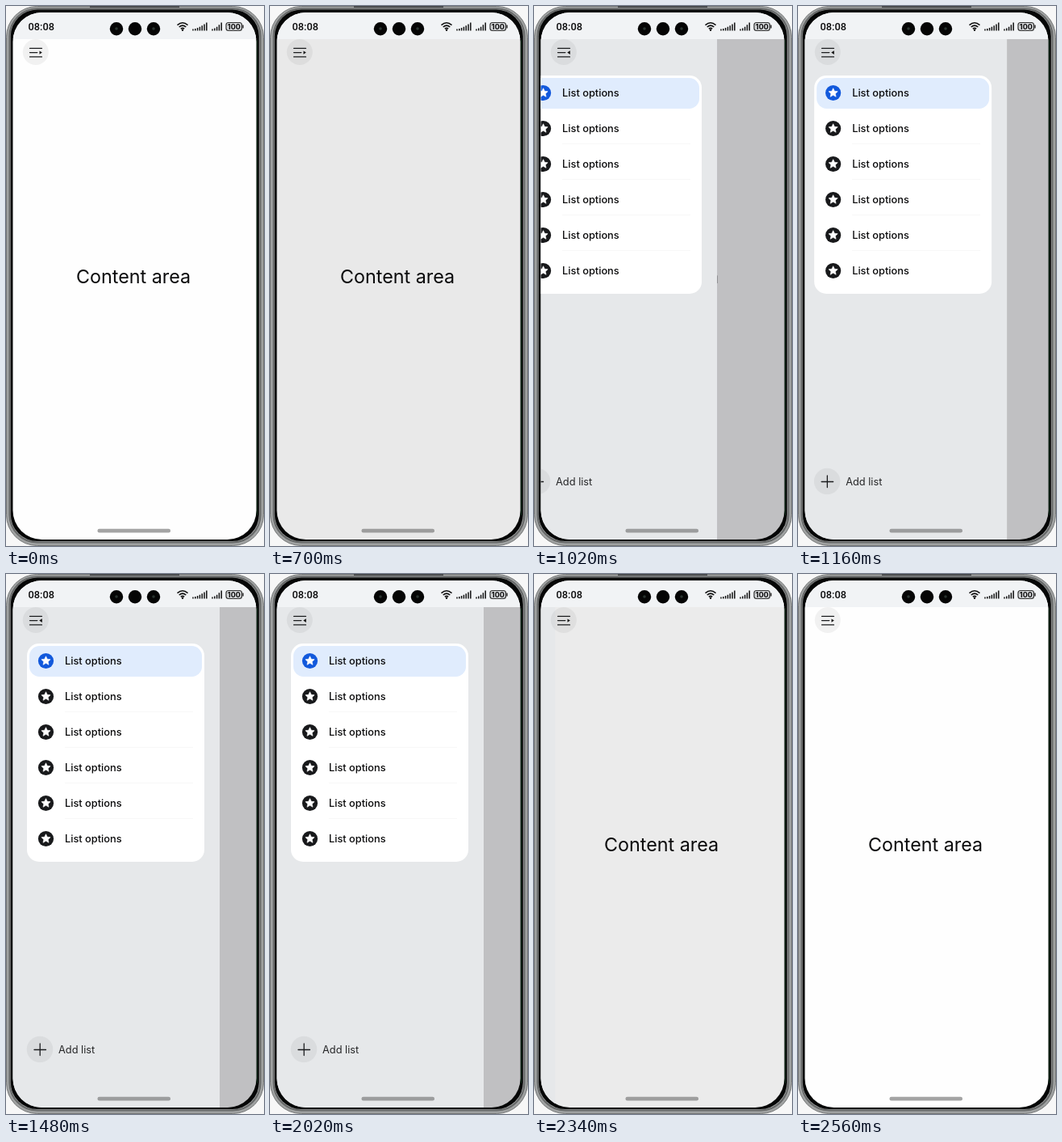
An HTML page for the animation above (2800 ms loop, 320 by 668 pixels).

```html
<!DOCTYPE html>
<html lang="en">
<head>
<meta charset="utf-8">
<title>Sidebar overlay</title>
<style>
  html, body { margin: 0; height: 100%; overflow: hidden; background: #f7f7f7; }
  svg { display: block; width: 100vw; height: 100vh; }
  text { font-family: Inter, sans-serif; fill: #0b0b0c; }
  .line { fill: none; stroke: #1b1c1e; stroke-width: 1.3; stroke-linecap: round; }
</style>
</head>
<body>
<svg viewBox="0 0 320 668">
  <defs>
    <clipPath id="screen"><rect x="8.5" y="8" width="302" height="652" rx="36"/></clipPath>
    <path id="star" d="M0-5.8 1.7-2.2 5.6-1.8 2.7.9 3.5 4.8 0 2.8-3.5 4.8-2.7.9-5.6-1.8-1.7-2.2Z"
      fill="#fff" stroke="#fff" stroke-width=".6" stroke-linejoin="round"/>
  </defs>

  <!-- phone body -->
  <rect x=".5" y=".5" width="319" height="667" rx="38" fill="#a0a2a2" stroke="#757777"/>
  <rect x="4.5" y="3.5" width="311" height="660" rx="34" fill="none" stroke="#666868" stroke-width="2"/>
  <rect x="5.8" y="4.5" width="308" height="657.500" rx="33" fill="#050606"/>
  <path d="M104 1H215" stroke="#4a4c4e" stroke-width="2"/>
  <path d="M311.5 42V630" stroke="#0d2b17"/>

  <g clip-path="url(#screen)">
    <rect width="320" height="668" fill="#fefefe"/>
    <text x="87" y="343" font-size="23.3">Content area</text>
    <rect id="dim" y="41" width="320" height="627" fill="#00040a"/>

    <g id="panel">
      <rect x="-20" y="41" width="285" height="627" fill="#e6e8ea"/>
      <rect x="26" y="86" width="220" height="270" rx="15" fill="#fff"/>
      <rect x="29" y="89" width="214" height="38" rx="12.5" fill="#e0ecfd"/>
      <g id="options"></g>
      <circle cx="42" cy="588" r="16.3" fill-opacity=".05"/>
      <path class="line" d="M35 588.5H49.5M42.2 581V595.5"/>
      <text x="65" y="593" font-size="12.8" fill-opacity=".88">Add list</text>
    </g>

    <circle cx="36.8" cy="57" r="16" fill-opacity=".05"/>
    <path class="line" d="M29.5 52.3H44.5M29.5 57.6H38.8M29.5 62.9H44.5"/>
    <path id="arrow" fill="#111"/>

    <!-- status bar -->
    <rect width="320" height="41" fill="#f1f3f5"/>
    <text x="27.5" y="30" font-size="12.8" font-weight="500" style="font-family: Roboto, sans-serif">08:08</text>
    <g id="cameras"></g>
    <g fill="none" stroke="#111" stroke-width="1.5">
      <path d="M212.5 23.6Q219 18 225.5 23.6M214.7 26Q219 22.3 223.3 26M216.8 28.3Q219 26.4 221.2 28.3"/>
      <path id="signal"/>
      <rect x="273" y="20.5" width="19.5" height="10" rx="3" fill="#d5d7d9" stroke="#333" stroke-width="1.2"/>
      <path d="M294 23.5V27.5" stroke="#333"/>
    </g>
    <circle cx="219" cy="29.7" r="1.2"/>
    <text x="282.8" y="29" font-size="9" font-weight="700" text-anchor="middle">100</text>
    <rect id="home" x="113.5" y="646.8" width="90.5" height="4.7" rx="2.3" fill="#777"/>
  </g>
</svg>
<script>
const LOOP = 2800, WIDTH = 257;
const $ = id => document.getElementById(id);
const repeat = (n, draw) => Array.from({ length: n }, (_, i) => draw(i)).join('');

$('options').innerHTML = repeat(6, i => {
  const y = 107.5 + 44 * i;
  return `<circle cx="49.5" cy="${y}" r="9.6" fill="${i ? '#18191b' : '#1259dc'}"/>
    <use href="#star" x="49.5" y="${y}"/>
    <text x="73" y="${y + 4.5}" font-size="12.8" font-weight="500">List options</text>` +
    (i && i < 5 ? `<path d="M73 ${y + 19}H232" stroke="#f7f7f7"/>` : '');
});
$('cameras').innerHTML = repeat(3, i => {
  const x = 137 + 23 * i;
  return `<circle cx="${x}" cy="28.3" r="8.2" fill="#050505"/>` +
    (i === 1 ? '' : `<circle cx="${x}" cy="28" r="1.8" fill="#29332f"/>`);
});
const bars = (x, n) =>
  repeat(n, i => `M${x + 2.8 * i} 30.5v${-(2 + 8 * (i / (n - 1)) ** 1.5)}`);
$('signal').setAttribute('d', bars(232, 7) + bars(256, 5));

// The screen refreshes only at these moments.
const ticks = [0, 700, 780, 890, 950, 1020, 1080, 1160, 1240, 1320,
  2020, 2100, 2180, 2260, 2340, 2400, 2460];
const dimKeys = [[0, 0], [660, 0], [780, .245], [2020, .245], [2100, .32],
  [2180, .32], [2340, .075], [2460, 0], [LOOP, 0]];

const clamp = v => Math.min(1, Math.max(0, v));

// cubic-bezier(.2, 0, .2, 1)
function ease(u) {
  let lo = 0, hi = 1;
  for (let i = 0; i < 20; i++) {
    const s = (lo + hi) / 2;
    if (.6 * s * (1 - s) + s ** 3 < u) lo = s; else hi = s;
  }
  return lo * lo * (3 - 2 * lo);
}

function interpolate(keys, t) {
  const i = keys.findIndex(([time]) => time > t);
  const [t0, a] = keys[i - 1], [t1, b] = keys[i];
  return a + (b - a) * (t - t0) / (t1 - t0);
}

function render(now) {
  const clock = now % LOOP;
  const t = ticks.findLast(tick => tick <= clock);
  const shown = ease(clamp((t - 724) / 543)) - ease(clamp((t - 2072) / 400));
  const open = t >= 780 && t < 2100;
  $('panel').setAttribute('transform', `translate(${((shown - 1) * WIDTH).toFixed(2)})`);
  $('dim').setAttribute('fill-opacity', interpolate(dimKeys, t));
  $('arrow').setAttribute('d', open ? 'M44.8 55.2V60L41.2 57.6Z' : 'M41.5 55.5V59.7L44.8 57.6Z');
  // The bar fades while the panel slides in under it.
  $('home').setAttribute('fill-opacity', t > 700 && shown < .2 && open ? .2 : .66);
  requestAnimationFrame(render);
}
render(performance.now());
</script>
</body>
</html>
```
